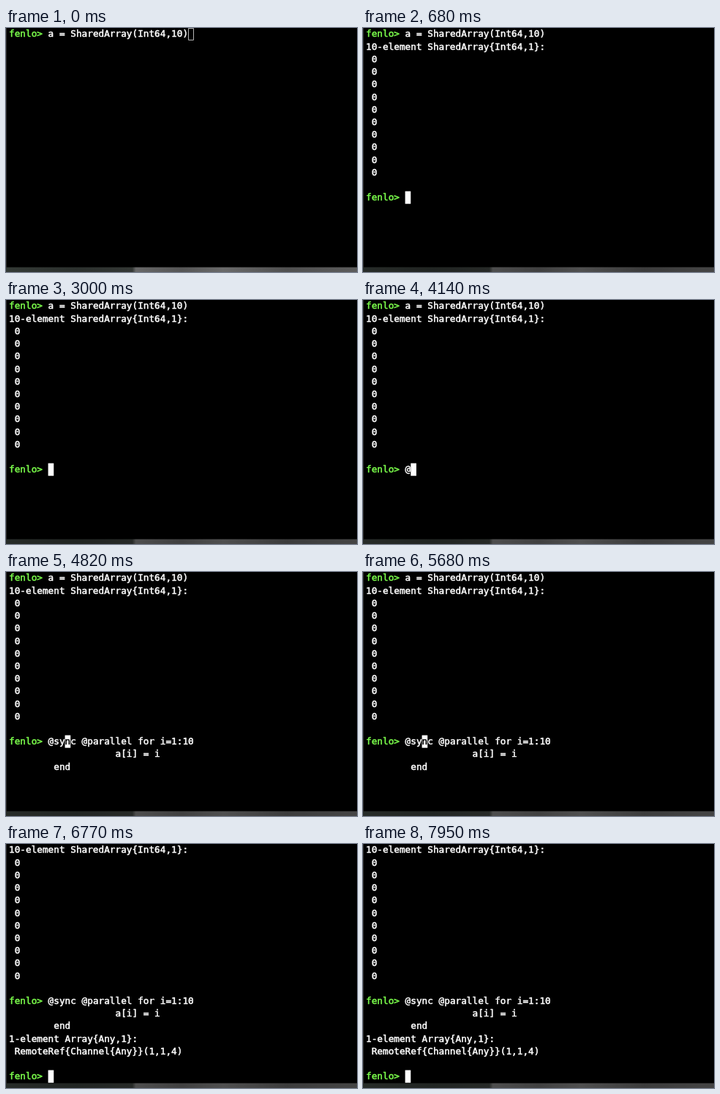
Recreate the animation shown at these times as an HTML page with a canvas. Size 480 by 334 pixels, loop 8 s.

```html
<!DOCTYPE html>
<html lang="en">
<head>
<meta charset="utf-8">
<style>
  html, body { margin: 0; width: 100%; height: 100%; overflow: hidden; background: #000; }
  canvas { display: block; }
</style>
</head>
<body>
<canvas id="stage"></canvas>
<script>
const W = 480, H = 334, LOOP = 8000;
const CELL = 7.66, ROW = 17.22, LEFT = 4, BASE = 12.4;
const PROMPT = "fenlo> ", GREEN = "#7cff4c", WHITE = "#fff";

// Key moments in ms
const FOCUS = 200, ENTER = 420, KEYS = [4100, 4220, 4320],
      RECALL = 4550, RUN = 5860, RESULT = 5950;

const canvas = document.getElementById("stage");
const ctx = canvas.getContext("2d");
const dpr = window.devicePixelRatio || 1;
canvas.width = W * dpr;
canvas.height = H * dpr;
canvas.style.width = W + "px";
canvas.style.height = H + "px";
ctx.scale(dpr, dpr);

const first = PROMPT + "a = SharedArray(Int64,10)";
const zeros = ["10-element SharedArray{Int64,1}:", ...Array(10).fill(" 0"), ""];
const loopCode = [
  PROMPT + "@sync @parallel for i=1:10",
  " ".repeat(19) + "a[i] = i",
  " ".repeat(8) + "end"
];
const result = ["1-element Array{Any,1}:", " RemoteRef{Channel{Any}}(1,1,4)", ""];

// Screen lines, scroll offset and cursor cell at time t
function screen(t) {
  if (t < ENTER) return { lines: [first], scroll: 0, row: 0, col: first.length };
  const lines = [first, ...zeros];
  if (t < RECALL) {
    const typed = PROMPT + "@sy".slice(0, KEYS.filter(k => t >= k).length);
    return { lines: [...lines, typed], scroll: 0, row: 13, col: typed.length };
  }
  lines.push(...loopCode);
  if (t < RUN) return { lines, scroll: 0, row: 13, col: 10 };
  if (t < RESULT) return { lines, scroll: 0, row: 16, col: 0 };
  lines.push(...result, PROMPT);
  return { lines, scroll: 1, row: lines.length - 1, col: PROMPT.length };
}

// A thin outline gives the glyphs their medium weight
function write(text, col, row, color) {
  const x = LEFT + col * CELL, y = BASE + row * ROW;
  ctx.fillStyle = ctx.strokeStyle = color;
  ctx.lineWidth = 0.5;
  ctx.fillText(text, x, y);
  ctx.strokeText(text, x, y);
}

function drawDesktop(focused) {
  const g = ctx.createLinearGradient(0, 0, W, 0);
  [[0, "#343a36"], [0.2, "#2c312e"], [0.36, "#343835"], [0.37, "#686868"],
   [0.5, "#565656"], [0.62, "#6a6a6a"], [0.8, "#505050"], [1, "#5c5c5c"]]
    .forEach(([p, c]) => g.addColorStop(p, c));
  ctx.fillStyle = g;
  ctx.fillRect(0, 327.5, W, 7);
  if (focused) {
    ctx.fillStyle = "rgba(0,0,0,.25)";
    ctx.fillRect(0, 327.5, W, 7);
  }
  ctx.fillStyle = "#383838";
  ctx.fillRect(0, 0, 0.8, 328);
}

function drawCursor(s, row, focused) {
  const x = LEFT + s.col * CELL, y = row * ROW - 0.4;
  if (!focused) {
    ctx.strokeStyle = "#b4b4b4";
    ctx.lineWidth = 1;
    ctx.strokeRect(249.5, 0.5, 7, 16);
    return;
  }
  ctx.fillStyle = WHITE;
  ctx.fillRect(x, y, CELL, ROW);
  const under = (s.lines[s.row] || "")[s.col];
  if (under) write(under, s.col, row, "#000");
}

function draw(t) {
  const focused = t >= FOCUS, s = screen(t);
  ctx.fillStyle = "#000";
  ctx.fillRect(0, 0, W, H);
  drawDesktop(focused);
  ctx.font = '12.72px "DejaVu Sans Mono", monospace';
  ctx.lineJoin = "round";
  s.lines.slice(s.scroll).forEach((line, row) => {
    const start = line.startsWith(PROMPT) ? PROMPT.length : 0;
    if (start) write(PROMPT, 0, row, GREEN);
    write(line.slice(start), start, row, WHITE);
  });
  drawCursor(s, s.row - s.scroll, focused);
}

function tick() {
  draw(performance.now() % LOOP);
  requestAnimationFrame(tick);
}
tick();
</script>
</body>
</html>
```
